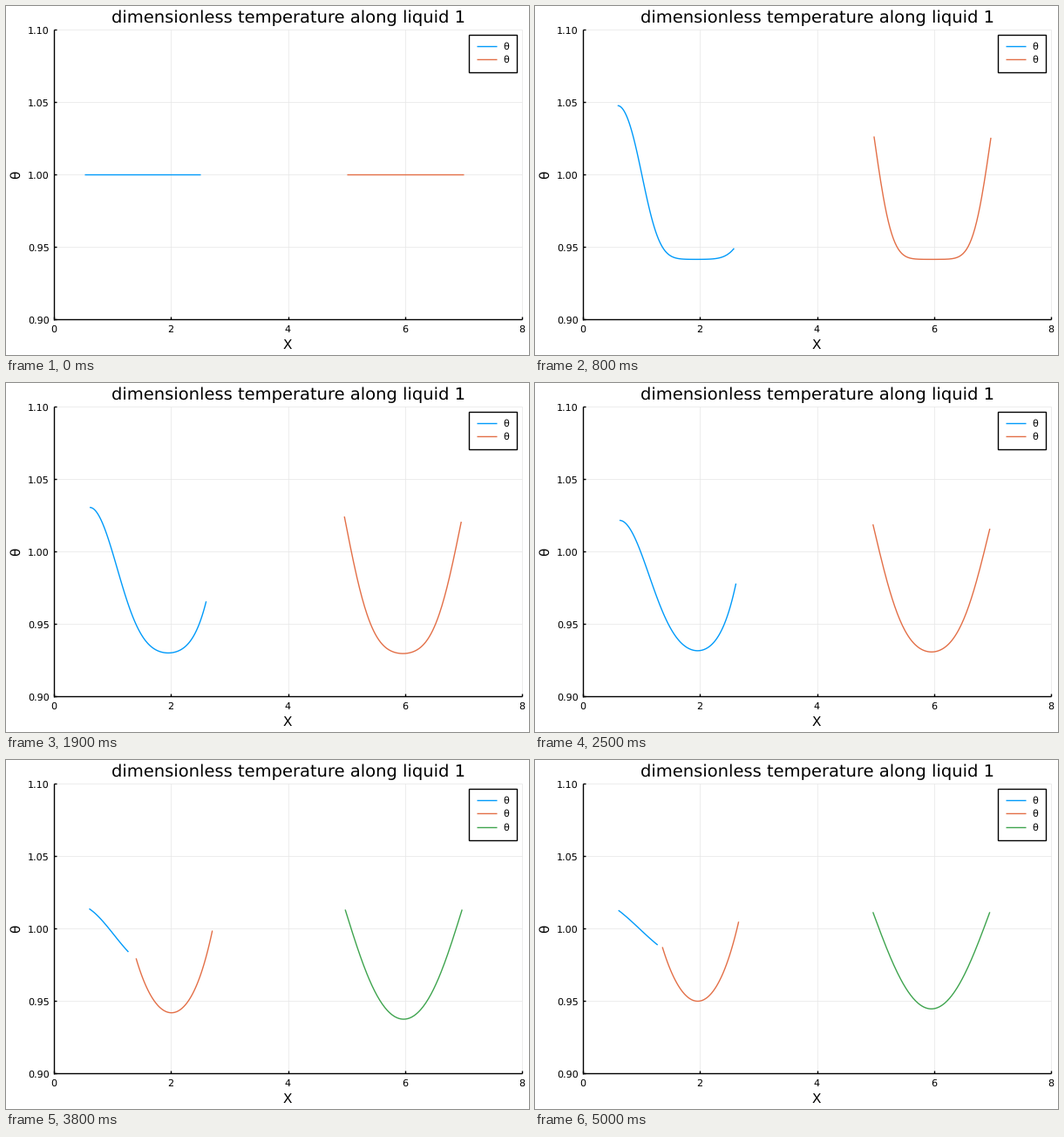
Recreate the animation shown at these times as a matplotlib script. Size 600 px wide and 400 px high, loop 5.05 s.

```python
import math

import numpy as np
import matplotlib.pyplot as plt
from matplotlib.animation import FuncAnimation
from matplotlib.patches import Rectangle

plt.rcParams["font.family"] = "DejaVu Sans"
plt.rcParams["text.hinting"] = "none"

W, H, DPI = 600, 400, 100
FRAMES, STEP = 101, 50
SPLIT = 53                      # frame in which a bubble cuts the left slug
BLUE, ORANGE, GREEN = "#009afa", "#e36f47", "#3ea44e"
LEFT, RIGHT, TOP, BOTTOM = 55.3, 592, 27.2, 359.2
REST = 193.2                    # height of theta = 1
HEATED = 28                     # heated length of the left slug
CUT = 45                        # length of the piece cut off

erfc = np.vectorize(math.erfc, otypes=[float])


def ramp_erfc(z):
    """Second repeated integral of erfc, scaled to 1 at z = 0."""
    ierfc = np.exp(-z * z) / math.sqrt(math.pi) - z * erfc(z)
    return erfc(z) - 2 * z * ierfc


def hermite(u, h, v0, v1, m0, m1):
    return ((2 * u**3 - 3 * u**2 + 1) * v0 + (3 * u**2 - 2 * u**3) * v1
            + h * ((u**3 - 2 * u**2 + u) * m0 + (u**3 - u**2) * m1))


def track(t, times, values):
    """Smooth curve through a few timed values."""
    slopes = np.gradient(values, times)
    i = int(np.clip(np.searchsorted(times, t) - 1, 0, len(times) - 2))
    h = times[i + 1] - times[i]
    return hermite((t - times[i]) / h, h, values[i], values[i + 1],
                   slopes[i], slopes[i + 1])


def ring(t, period=12):
    """Damped oscillation of a slug between vapour springs."""
    return math.exp(-t / 9.2) * math.cos(2 * math.pi * t / period)


def spread(t):
    return 5.7 * math.sqrt(max(t, 0.01))


def cold(t):
    return REST + 121.8 * (1 - math.exp(-t / 10)) - 0.06 * max(0, t - 44)


def heat(t):
    return 233 * (1 - math.exp(-t / 9.2))


def right_warmth(t):
    return track(t, [0, 8, 16, 38, 50, 62, 76, 100],
                 [0, 3, 12.7, 62, 84, 106, 117, 125])


def whole_slug(t):
    length, w = 133.6, spread(t)
    x0 = 93.3 + 0.073 * t - 3.8 * ring(t)
    s = np.linspace(0, length, 120)
    warm = 0.5 * (erfc((s - HEATED) / w) - erfc((s + HEATED) / w))
    y = (cold(t) - heat(t) * warm
         - right_warmth(t) * ramp_erfc((length - s) / w))
    return x0 + s, y


def first_piece(t):
    times = [SPLIT, 62, 76, 100]
    x0 = 94.9 + 0.018 * (t - 56) - 3.2 * ring(t - 56)
    u = np.linspace(0, 1, 60)
    y = hermite(u, CUT,
                track(t, times, [161, 167, 170.5, 172.3]),
                track(t, times, [246, 230.5, 220, 212]),
                track(t, times, [0.1, 0.45, 0.65, 0.75]),
                track(t, times, [2.1, 1.75, 1.05, 0.8]))
    return x0 + CUT * u, y


def second_piece(t):
    length, w = 87.5, 1.12 * spread(t)
    rise = 1 - math.exp(-(t - SPLIT + 0.5) / 3)
    x0 = 231.6 + 8.8 * rise * math.exp(-(t - 62) / 26) - length
    s = np.linspace(0, length, 100)
    left_warmth = track(t, [SPLIT, 62, 76, 100], [64, 75, 85, 95.5])
    y = (cold(t) - left_warmth * ramp_erfc(s / w)
         - right_warmth(t) * ramp_erfc((length - s) / w))
    return x0 + s, y


def far_slug(t):
    length, w = 134.1, spread(t)
    if t < SPLIT:
        x1 = 523.8 - 0.04 * t + 1.6 * ring(t)
    else:
        x1 = 524.4 - 0.06 * (t - 56) - 2.5 * ring(t - SPLIT, 18)
    times = [0, 6, 11, 16, 24, 38, 50, 62, 76, 100]
    near = track(t, times,
                 [REST, 168, 154, 149.5, 148.5, 153, 162, 169.5, 171.5, 174.5])
    far = track(t, times,
                [REST, 168, 155, 151, 151.5, 159, 167, 169.5, 171.5, 174.5])
    s = np.linspace(0, length, 140)
    base = cold(t)
    y = (base - (base - near) * erfc(s / w)
         - (base - far) * erfc((length - s) / w))
    return x1 - length + s, y


fig = plt.figure(figsize=(W / DPI, H / DPI), dpi=DPI, facecolor="white")
ax = fig.add_axes([0, 0, 1, 1])
ax.set_xlim(0, W)
ax.set_ylim(H, 0)
ax.axis("off")


def line(x, y, color="black", lw=1.0, z=2):
    return ax.plot(x, y, color=color, lw=lw, zorder=z,
                   solid_capstyle="butt", solid_joinstyle="round")[0]


def label(x, y, text, size=8, ha="center", **kw):
    return ax.text(x, y, text, fontsize=size, ha=ha, va="baseline",
                   color="black", zorder=6, **kw)


for k in range(5):
    x = LEFT + k * (RIGHT - LEFT) / 4
    y = BOTTOM - k * (BOTTOM - TOP) / 4
    line([x, x], [TOP, BOTTOM], "#e6e6e6", 0.5, 1)
    line([LEFT, RIGHT], [y, y], "#e6e6e6", 0.5, 1)
    line([x, x], [BOTTOM, BOTTOM - 3])
    line([LEFT, LEFT + 3], [y, y])
    label(x - 0.25, 374.2, str(2 * k))
    label(49.9, y + 4.6, f"{0.9 + 0.05 * k:.2f}", ha="right")
line([LEFT, LEFT], [TOP, BOTTOM + 0.7])
line([LEFT - 0.7, RIGHT], [BOTTOM, BOTTOM])

mid = (LEFT + RIGHT) / 2
label(mid, 19.5, "dimensionless temperature along liquid 1", 14)
label(mid - 0.7, 393.3, "X", 11)
label(16, REST - 0.3, "θ", 11, rotation=90, rotation_mode="anchor")

frame = Rectangle((531.3, 33.2), 54.9, 43, fc="white", ec="black", lw=1, zorder=4)
ax.add_patch(frame)
keys = []
for k, color in enumerate((BLUE, ORANGE, GREEN)):
    y = 45.8 + 15.5 * k
    keys.append((line([540, 563], [y, y], color, z=5),
                 label(570.5, y + 3.9, "θ", ha="left")))

curves = [line([], [], c, z=3) for c in (BLUE, ORANGE, GREEN)]


def draw(t):
    split = t >= SPLIT
    if split:
        shapes = [first_piece(t), second_piece(t), far_slug(t)]
    else:
        shapes = [whole_slug(t), far_slug(t), ([], [])]
    for curve, (x, y) in zip(curves, shapes):
        curve.set_data(x, y)
    frame.set_height(58.8 if split else 43)
    for part in keys[2]:
        part.set_visible(split)
    return curves


anim = FuncAnimation(fig, draw, frames=FRAMES, interval=STEP,
                     init_func=lambda: draw(0), repeat=True, repeat_delay=0,
                     blit=False)
plt.show()
```
